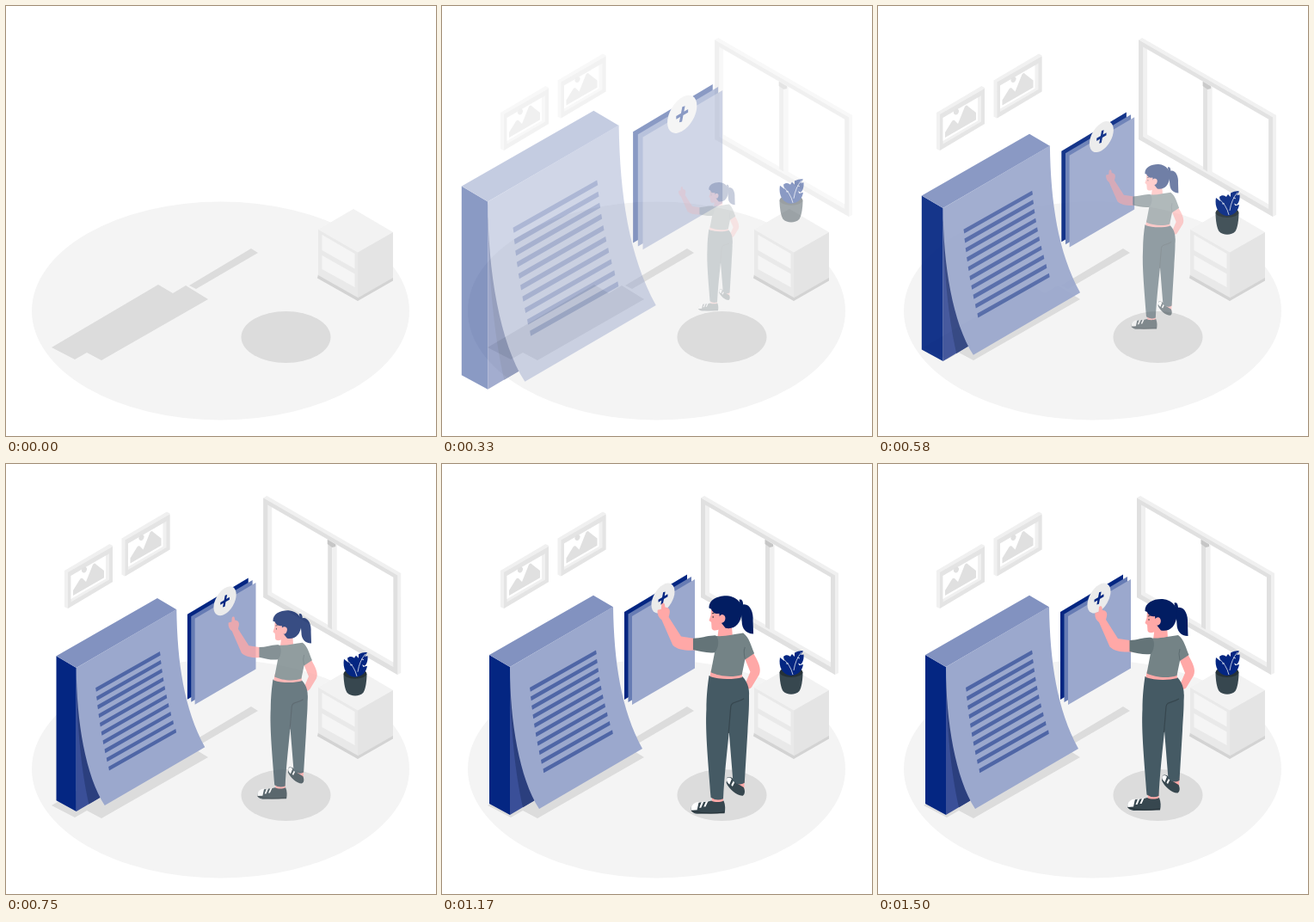
Recreate the animation shown at these times as an HTML page. Size 500 by 500 pixels, loop 1540 ms.

```html
<!DOCTYPE html>
<html lang="en">
<head>
<meta charset="utf-8">
<title>Adding a document</title>
<style>
html, body { margin: 0; width: 100%; height: 100%; overflow: hidden; background: #fff; }
svg { display: block; width: 100vw; height: 100vh; }
</style>
</head>
<body>
<svg viewBox="0 0 500 500">
  <defs>
    <g id="picture">
      <path fill="#f0f0f0" d="M68 124 120.500 93 124 95V137L71.500 168 68 166Z"/>
      <path fill="#e4e4e4" d="M72 126 124 96V137L72 168Z"/>
      <path fill="#f0f0f0" d="M75.500 130 120 104.300V134.500L75.500 160.500Z"/>
      <path fill="#fff" d="M75.500 130 116 106.600V133.500L75.500 157Z"/>
      <path fill="#e0e0e0" d="M78 153V147L86 134Q88 131.500 90 134L93 137 101 117Q103 114 105 117L114 124V132.300Z"/>
      <ellipse fill="#e0e0e0" cx="91" cy="123" rx="2.800" ry="3.600" transform="rotate(25 91 123)"/>
    </g>
  </defs>

  <g id="floor">
    <ellipse cx="249.500" cy="354.500" rx="219.500" ry="127" fill="#f4f4f4"/>
    <g fill="#dcdcdc">
      <path d="M53 397 177 324 194 334 209 325 235 341 111 412 94 403 80 411Z"/>
      <path d="M213 325 285 282 293 287 221 329Z"/>
      <ellipse cx="325.500" cy="385" rx="52" ry="30"/>
    </g>
  </g>

  <g id="window">
    <path fill="#f0f0f0" d="M301 39.500 305 37 461 127V243L457 245 301 155Z"/>
    <path fill="#e0e0e0" d="M301 39.500 457 129.500V245L301 155Z"/>
    <path fill="#f0f0f0" d="M306 47.500 452 131.800V236L306 152Z"/>
    <path fill="#fff" d="M311 50.500 452 131.800V230.500L311 149.500Z"/>
    <path fill="#e0e0e0" d="M376 88 381 91V192.500L376 189.600Z"/>
    <path fill="#f0f0f0" d="M381 91 386.500 94V193L381 192.500Z"/>
    <path fill="#c6c6c6" d="M375.500 87.700 385 93.200V96L381 97 375.500 93Z"/>
  </g>

  <g id="pictures">
    <use href="#picture"/>
    <use href="#picture" x="66.500" y="-37.500"/>
  </g>

  <g id="cabinet">
    <path fill="#d3d3d3" d="M363 312 409 338 450 315V319.500L409 343 362 316.500Z"/>
    <path fill="#f2f2f2" d="M363 260 404 236 450 263 409 287Z"/>
    <path fill="#e9e9e9" d="M363 260 409 286.500V339L363 313Z"/>
    <path fill="#e4e4e4" d="M409 286.500 450 263V316L409 339.500Z"/>
    <path fill="#f5f5f5" d="M367.500 266 405.500 288V305.500L367.500 284ZM367.500 290 405.500 311.500V327L367.500 306Z"/>
  </g>

  <g id="plant">
    <path fill="#37474f" d="M392.500 242C392.500 251 394 260 396.500 264 401 269 411 269 415.500 264 418 260 419.500 251 419.500 242Z"/>
    <ellipse cx="406" cy="242" rx="13.300" ry="6" fill="#263238"/>
    <path fill="#042682" d="M405 246C396 245 391 236 393 225L398 229 397 224C400 221 404 222 407 226L413 236 416 234 420 233C419 240 414 246 405 246Z"/>
    <path fill="#042682" d="M407 243C402 234 403 225 407 221L410 224 410 219.500C414 217.500 417 217 420 217.500L417 222 420.500 221.500C421 227 419.500 231 417 233L414 231.500 416 235C414 240 410 243 407 243Z"/>
    <path fill="none" stroke="#e9ecf5" stroke-width=".8" d="M396 226Q405 233 408 245M418 219Q411 227 409 240M403 232 400 232M413 225 416 226"/>
  </g>

  <g id="papers">
    <path fill="#042682" d="M212 172 285 128.500V231L212 274Z"/>
    <path fill="#677cb4" d="M216.500 174.500 290 131V234L216.500 277Z"/>
    <path fill="#9ba8cd" d="M221 177 294 134V237.500L221 280Z"/>
    <g transform="matrix(.866 -.5 0 1 257 156)">
      <circle r="15.600" fill="#ebebeb"/>
      <path d="M-6.300 0H6.300M1.600-6.300-1.600 6.300" stroke="#042682" stroke-width="3"/>
    </g>
    <path fill="#042682" d="M55 222 79 236V408L55 395Z"/>
    <path fill="#8292c0" d="M55 222 176 152.700 199 166.300 79 236Z"/>
    <path fill="#3a4f98" d="M79 236V408L107 391.500Z"/>
    <path fill="#2b3f7e" d="M79 250C80 310 85 360 94 399.300L108 391Z"/>
    <path fill="#9ba8cd" d="M79 236 199 166C200 230 208 285 233 331L113 401C90 365 79 300 79 236Z"/>
    <path id="lines" fill="#4f66a6"/>
  </g>

  <g id="person">
    <!-- far arm -->
    <path fill="#ffa8a7" d="M350 226 360 221C366 231 370 239 367 246L358.500 260C355 264 349 262 351 257L357 243Z"/>
    <!-- feet -->
    <path fill="#ffa8a7" d="M340 364H350.500L350 376H342ZM313.500 380H326.500V393H314Z"/>
    <path fill="#37474f" d="M331 362C335 360 339 364 342 368.500L349.500 373C351.500 377 351 381 348.500 382.500 342 383 333 375 330 368Z"/>
    <path fill="#fff" d="M331 362.500Q334 361 336 363.500L333.500 370Q329 366 331 362.500ZM338 365.500 339.500 367 337 372 335.500 370.500Z"/>
    <path fill="#37474f" d="M313 388C317 390 323 390 327 388 329 393 329 398 328 402.500L297 403C292 402 290 400 290 396 294 388 304 391 313 388Z"/>
    <path fill="#fff" d="M290 396Q292 390 299 389.500L297 398.500 290.500 399ZM302 389.500 304.500 389 301.500 396 299.500 396ZM307 389 309.500 388.500 306.500 395 304.500 395Z"/>
    <path fill="none" stroke="#263238" d="M290.500 399.500Q308 404 328 401"/>
    <!-- trousers -->
    <path fill="#455a64" d="M330 270 355.500 268C356 285 354.500 297 354 310L350.500 368Q344 372 337.500 366L333 310Z"/>
    <path fill="#455a64" d="M310.500 247C322 251 338 251 348 248 355 255 357 265 355 275 348 278 338 278 335 282 334 312 329 340 326.500 386Q319 389 312.500 384.500C310 350 306 310 307.500 285 307.500 270 309 257 310.500 247Z"/>
    <path fill="none" stroke="#37474f" stroke-width="1.200" d="M350 273C342 278 336 276 335 282L332.500 312"/>
    <!-- waist, neck and raised arm -->
    <path fill="#ffa8a7" d="M313 240 347.500 243 348 249C337 252 321 251.500 311.500 248Z"/>
    <path fill="#ffa8a7" d="M322 188 336 188 337 203 320 204Z"/>
    <path fill="#ffa8a7" d="M257 184C253 181 252 177 252.500 173L256.500 172 257 166.500C258 164.500 260.500 165 260.500 167L261 170C265 170 267 173 266 177L265 181 279 203 296 205.500 295 218.500C284 219 275 218 269.500 212.500Z"/>
    <!-- top -->
    <path fill="#748386" d="M316 202C326 204 339 200 349 199 356 204 358 214 361.500 222L351 229 347.500 246C336 250 321 247.500 312.500 243.500L317 220Z"/>
    <path fill="#647478" d="M292.500 205C302 205 310 201 318 202 323 206 321 217 317 221 309 222 301 220 292.500 218Z"/>
    <path fill="none" stroke="#5d6c70" d="M351 228Q349 220 351 215"/>
    <!-- head -->
    <path fill="#ffa8a7" d="M313 169 312.500 179 310.500 185 313 187 313.500 194C315 197.500 320 196.500 325 193.500L333 188 330 168Z"/>
    <path fill="#021d62" d="M346 168C355 163 361 174 360 185L360.500 200C352 200 347.500 194 347.500 186Z"/>
    <path fill="#021d62" d="M344.500 161.500Q348.500 160 349 167L346 170Z"/>
    <path fill="#021d62" d="M310.500 171C310 161 321 156.500 331 157 343 158 349.500 167 347.500 177 346 189 339 195.500 329 193.500L323 186 322 177C317 178 314 175 313 172Z"/>
    <ellipse cx="325" cy="183" rx="3.800" ry="4.800" fill="#ffa8a7" transform="rotate(15 325 183)"/>
    <path fill="none" stroke="#263238" stroke-width=".9" d="M315 180V182M313.800 177 316.500 176.500"/>
  </g>
</svg>
<script>
const LOOP = 1540, LEAD = 32, FPS = 24;
const el = id => document.getElementById(id);
const parts = Object.fromEntries(
  ["window", "pictures", "plant", "papers", "person"].map(id => [id, el(id)]));

// Ten text lines that follow the bend of the sheet
let d = "";
for (let i = 0; i < 10; i++) {
  const s = i / 9;
  const x1 = 102 + 8 * s + 7.5 * s * s, x2 = 179 + 8 * s + 11 * s * s;
  const y1 = 260 + 10.5 * i, y2 = 216.5 + 10.3 * i;
  d += `M${x1} ${y1}L${x2} ${y2} ${x2 + 0.8} ${y2 + 4.5} ${x1 + 0.8} ${y1 + 4.7}Z`;
}
el("lines").setAttribute("d", d);

const bez = (a, b, u) => 3 * a * u * (1 - u) ** 2 + 3 * b * u * u * (1 - u) + u ** 3;

// Ease with overshoot: cubic-bezier(.36, -.01, .5, 1.38)
function ease(x) {
  if (x >= 1) return 1;
  let lo = 0, hi = 1;
  for (let i = 0; i < 24; i++) {
    const u = (lo + hi) / 2;
    if (bez(0.36, 0.5, u) < x) lo = u; else hi = u;
  }
  return bez(-0.01, 1.38, lo);
}

const zoom = (s, x, y) => `translate(${x} ${y}) scale(${s}) translate(${-x} ${-y})`;

function pose(part, p, transform) {
  part.setAttribute("opacity", Math.max(0, Math.min(1, p)));
  if (transform) part.setAttribute("transform", transform);
}

function draw(t) {
  const step = Math.floor((t + 4) * FPS / 1000);
  const time = step * 1000 / FPS + LEAD;
  const shown = step >= 3;
  const p = shown ? ease(time / 1000) : 0;
  const q = shown ? ease(time / 1500) : 0;
  pose(parts.window, p, `translate(${30 * (1 - p)} 0)`);
  pose(parts.pictures, p);
  pose(parts.plant, p, `translate(0 ${-30 * (1 - p)})`);
  pose(parts.papers, p, zoom(1.5 - 0.5 * p, 174.5, 268));
  pose(parts.person, q, zoom(0.5 + 0.5 * q, 310, 279.5));
}

const start = performance.now();
function tick() {
  draw((performance.now() - start) % LOOP);
  requestAnimationFrame(tick);
}
tick();
</script>
</body>
</html>
```
